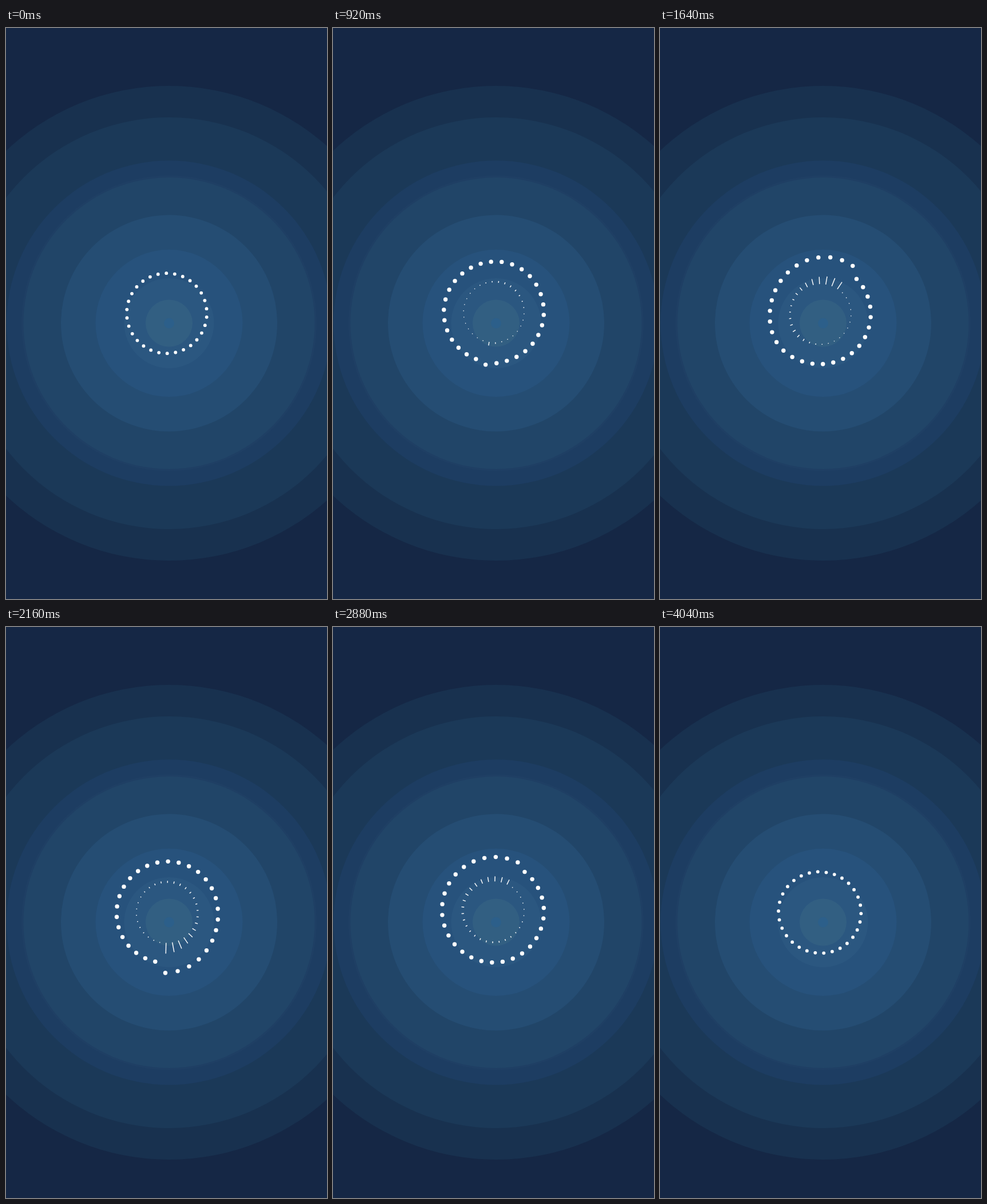
These frames come from a looping animation (561 px wide and 997 px high, 4080 ms). An HTML page with a canvas:

```html
<!DOCTYPE html>
<html lang="en">
<head>
<meta charset="utf-8">
<title>Pulse ring</title>
<style>
  html, body { margin: 0; width: 100%; height: 100%; overflow: hidden; background: #152745; }
  svg, canvas { position: absolute; left: 0; top: 0; width: 561px; height: 997px; display: block; }
</style>
</head>
<body>
<svg viewBox="0 0 561 997">
  <g id="discs"></g>
</svg>
<canvas id="ring"></canvas>
<script>
const W = 561, H = 997, LOOP = 4080, STEP = 40;
const COUNT = 30, SLOT = 2 * Math.PI / COUNT;
const START = -162.6 * Math.PI / 180;          // angle of the leading dot at time 0
const SPEED = 0.28425 * Math.PI / 180;         // radians per ms
const DECAY = 330;                             // ms

const discs = [
  [414.5, '#18314f'], [359.5, '#1b3958'], [284, '#1d3d62'], [258, '#1f3f64'],
  [254.5, '#214568'], [189, '#254d73'], [128.5, '#27527c'], [78.5, '#2b5780'],
  [41, '#325f82'], [9, '#2c5f8a']
];
document.getElementById('discs').innerHTML = discs
  .map(([r, fill]) => `<circle cx="285" cy="515.5" r="${r}" fill="${fill}"/>`).join('');

const beats = [
  { at: 330, size: 14, width: 90 },
  { at: 1060, size: 24, width: 80 },
  { at: 1530, size: 17, width: 160 },
  { at: 2090, size: 16, width: 140 },
  { at: 2620, size: 12, width: 290 },
  { at: 3290, size: 10, width: 130 },
  { at: 3700, size: 10, width: 160 }
];

const smooth = x => {
  const k = Math.min(1, Math.max(0, x));
  return k * k * (3 - 2 * k);
};
const loudness = t => beats.reduce(
  (sum, b) => sum + b.size * Math.exp(-0.5 * ((t - b.at) / b.width) ** 2), 0);

const canvas = document.getElementById('ring');
const ctx = canvas.getContext('2d');
const dpr = window.devicePixelRatio || 1;
canvas.width = Math.round(W * dpr);
canvas.height = Math.round(H * dpr);
ctx.scale(dpr, dpr);

function draw(t) {
  const open = smooth((t - 300) / 560) - smooth((t - 3440) / 600);
  const cx = 281;
  const cy = 498.2 - 1.8 * open * Math.cos(2 * Math.PI * (t - 1000) / 1750);
  const base = 70 + 17.3 * open;

  ctx.clearRect(0, 0, W, H);
  ctx.fillStyle = ctx.strokeStyle = '#fff';
  ctx.lineWidth = 1.4;
  for (let i = 0; i < COUNT; i++) {
    // Each dot is pushed out as the leading angle passes it, then sinks back.
    const age = i * SLOT / SPEED;
    const level = loudness(t - age) * Math.exp(-age / DECAY);
    const angle = START + SPEED * t - i * SLOT;
    const c = Math.cos(angle), s = Math.sin(angle);
    const r = base + level;

    ctx.globalAlpha = 1;
    ctx.beginPath();
    ctx.arc(cx + r * c, cy + r * s, 2.9 + 0.8 * open, 0, 2 * Math.PI);
    ctx.fill();

    const from = 52.3, to = 53.5 + level;
    ctx.globalAlpha = open;
    ctx.beginPath();
    ctx.moveTo(cx + from * c, cy + from * s);
    ctx.lineTo(cx + to * c, cy + to * s);
    ctx.stroke();
  }
}

const start = performance.now();
function tick() {
  const t = Math.max(0, performance.now() - start) % LOOP;
  draw(Math.floor(t / STEP) * STEP);
  requestAnimationFrame(tick);
}
tick();
</script>
</body>
</html>
```
